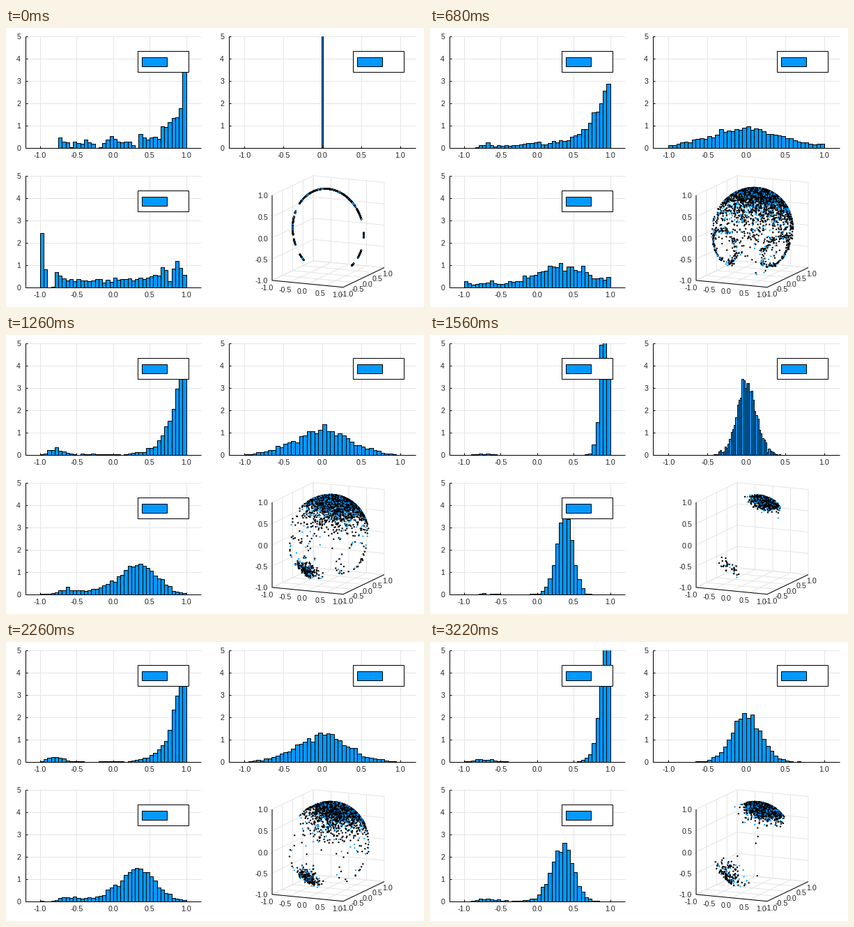
Recreate the animation shown at these times as a matplotlib script. Size 600 by 400 pixels, loop 3.24 s.

```python
import numpy as np
import matplotlib.pyplot as plt
from matplotlib.animation import FuncAnimation
from matplotlib.collections import LineCollection, PolyCollection
from matplotlib.patches import Rectangle

W, H, DPI = 600, 400, 100
PX = 72 / DPI
BLUE, GRID, INK = "#0099ff", "#e4e4e4", "#222222"
N = 3600
TICK_MS, LOOP_MS = 20, 3240
FLAT_STEPS = 12

# step, centre deg, in-plane spread, cross spread, tail,
# far share, far angle deg, far spread, ring share
KEYS = np.array([
    [11, 18, .55, .02, .30, .00, -150, .10, .14],
    [14, 18, .50, .50, .45, .00, -150, .10, .10],
    [20, 22, .068, .075, .0, .40, -158, .068, 0],
    [27, 20, .33, .38, .35, .06, -142, .16, .02],
    [34, 22, .118, .122, .18, .01, -140, .16, 0],
    [37, 21, .28, .33, .35, .04, -142, .16, .01],
    [41, 22, .105, .104, .08, .06, -154.5, .12, 0],
    [49, 20, .30, .35, .35, .06, -145, .16, .01],
    [56, 22, .122, .126, .08, .13, -154.5, .125, 0],
    [63, 20, .30, .36, .35, .05, -142, .16, .01],
    [69, 20.5, .165, .185, .25, .045, -139, .20, 0],
])

# start deg, end deg, share of the flat arc's outer pieces
PIECES = [(-137, -127, .03), (-113, -105, .03), (-99, -74, .10),
          (-69, -66, .025), (53, 69, .10), (87, 94, .03),
          (111, 124, .05), (134, 139, .02)]


def on_sphere(theta, phi):
    c = np.cos(phi)
    return np.column_stack([c * np.cos(theta), np.sin(phi), c * np.sin(theta)])


def flat_cloud(step, rng):
    """Broken arc in the plane of the first and third components."""
    wave = np.sin(step * (1.1 + .37 * np.arange(len(PIECES))))
    share = np.array([p[2] for p in PIECES]) * (1 + .3 * wave)
    kind = rng.choice(len(PIECES) + 1, N, p=[*share, 1 - share.sum()])
    theta = np.where(rng.random(N) < .67, rng.uniform(-54, 50.5, N),
                     rng.triangular(-54, 50, 50.5, N))
    for i, (a, b, _) in enumerate(PIECES):
        sel = kind == i
        theta[sel] = rng.uniform(a, b, sel.sum()) + 2 * wave[i]
    return on_sphere(np.radians(theta), np.zeros(N))


def ring(theta, y, n, rng):
    e = on_sphere(np.radians([theta]), np.arcsin([y]))[0]
    u = np.cross(e, [0, 1, 0])
    u /= np.linalg.norm(u)
    v = np.cross(e, u)
    r = np.radians(rng.normal(24, 2.5, n))[:, None]
    a = rng.uniform(0, 2 * np.pi, n)[:, None]
    return np.cos(r) * e + np.sin(r) * (np.cos(a) * u + np.sin(a) * v)


def cloud(step):
    rng = np.random.default_rng(100 + step)
    if step < FLAT_STEPS:
        return flat_cloud(step, rng)
    mid, s_in, s_out, tail, far, far_deg, s_far, rings = [
        np.interp(step, KEYS[:, 0], col) for col in KEYS[:, 1:].T]
    w = np.exp(tail * rng.standard_normal(N))
    g, k = rng.standard_normal((2, N))
    is_far = rng.random(N) < far
    theta = np.where(is_far, np.radians(far_deg) + s_far * g,
                     np.radians(mid) + s_in * w * g)
    phi = np.where(is_far, s_far, s_out * w) * k
    pts = on_sphere(theta, 1.55 * np.tanh(phi / 1.55))
    m = int(N * rings / 2)
    if m:
        pts[:m] = ring(-118, .05, m, rng)
        pts[m:2 * m] = ring(112, -.3, m, rng)
        rng.shuffle(pts)
    return pts


def nice_bins(v):
    lo, hi = v.min(), v.max()
    if hi - lo < 1e-6:
        return np.array([-.005, .005])
    raw = (hi - lo) / np.sqrt(N)
    base = 10 ** np.floor(np.log10(raw))
    r = raw / base
    size = base * (1 if r <= 1.1 else 2 if r <= 2.2 else 5 if r <= 5.5 else 10)
    first, last = np.floor(lo / size), np.floor(hi / size) + 1
    return np.arange(first, last + .5) * size


def project(c, b, a):
    return 462.5 + 51 * c + 29.5 * b, 291.7 + 4.9 * c - 14.1 * b - 61 * a


fig = plt.figure(figsize=(W / DPI, H / DPI), dpi=DPI, facecolor="white")
ax = fig.add_axes([0, 0, 1, 1])
ax.set_xlim(0, W)
ax.set_ylim(H, 0)
ax.axis("off")


def label(x, y, s, ha="center"):
    ax.text(x, y, s, ha=ha, va="center_baseline", color=INK,
            fontsize=10.6 * PX, family="Liberation Sans")


def lines(segs, color, z):
    ax.add_collection(LineCollection(segs, colors=color, linewidths=PX, zorder=z))


def box(x, y, w, h, face, z):
    ax.add_patch(Rectangle((x, y), w, h, fc=face, ec="black", lw=PX, zorder=z))


class Histogram:
    def __init__(self, left, right, top, legend_x):
        self.mid, self.unit = (left + right) / 2, (right - left) / 2.4
        self.base = top + 160
        grid, axes = [], [[(left, top), (left, self.base)],
                          [(left, self.base), (right, self.base)]]
        for v in np.arange(-1, 1.1, .5):
            x = self.mid + v * self.unit
            grid.append([(x, top), (x, self.base)])
            axes.append([(x, self.base), (x, self.base - 3)])
            label(x, self.base + 10, f"{v:.1f}")
        for v in range(6):
            y = self.base - 32 * v
            grid.append([(left, y), (right, y)])
            axes.append([(left, y), (left + 3, y)])
            label(left - 7, y, str(v), "right")
        lines(grid, GRID, 1)
        lines(axes, "black", 4)
        self.bars = PolyCollection([], facecolors=BLUE, edgecolors="black",
                                   linewidths=PX, zorder=3)
        ax.add_collection(self.bars)
        self.bars.set_clip_path(Rectangle((left, top - .5), right - left, 161,
                                          transform=ax.transData))
        box(legend_x, top + 21, 73, 30, "white", 5)
        box(legend_x + 6, top + 29.5, 36, 13, BLUE, 6)
        label(legend_x + 47, top + 36.5, "y1", "left")

    def show(self, v):
        edges = nice_bins(v)
        dens, _ = np.histogram(v, edges, density=True)
        x = self.mid + edges * self.unit
        y = self.base - 32 * np.minimum(dens, 8)
        b = self.base
        self.bars.set_verts([[(p, b), (p, t), (q, t), (q, b)]
                             for p, q, t in zip(x, x[1:], y)])


def draw_cube():
    grid = []
    for i, v in enumerate(np.arange(-1, 1.1, .5)):
        for path in ([(v, -1, -1), (v, 1, -1), (v, 1, 1)],
                     [(1, v, -1), (-1, v, -1), (-1, v, 1)],
                     [(-1, -1, v), (-1, 1, v), (1, 1, v)]):
            grid.append([project(*p) for p in path])
        s = f"{v:.1f}"
        shift = 0 if v < 0 else -2
        label(375 + 25.5 * i + shift / 2, 372.5 + 2.4 * i, s)
        label(490 + 14.4 * i, 381 - 7.2 * i, s)
        label(376, 362.5 - 30.5 * i, s, "right")
    lines(grid, GRID, 1)
    frame = [(-1, -1, 1), (-1, -1, -1), (1, -1, -1), (1, 1, -1)]
    lines([[project(*p) for p in frame]], "black", 2)


hists = [Histogram(28, 279.5, 12, 189),
         Histogram(320, 588, 12, 497.5),
         Histogram(28, 279.5, 212, 189)]
draw_cube()
tint = np.random.default_rng(5).random(N) < .27
dots = ax.scatter(np.zeros(N), np.zeros(N), s=np.where(tint, 2.4, 2.9),
                  c=np.where(tint, BLUE, "black"), linewidths=0, zorder=3)


def step_at(tick):
    """Steps last 20, 100 and 20 ms in turn."""
    cycle, rest = divmod(tick * TICK_MS, 140)
    return 3 * cycle + (rest >= 20) + (rest >= 120)


shown = None


def update(tick):
    global shown
    step = step_at(tick)
    if step != shown:
        shown = step
        pts = cloud(step)
        for hist, v in zip(hists, pts.T):
            hist.show(v)
        a, b, c = pts.T
        dots.set_offsets(np.column_stack(project(c, b, a)))
    return [dots, *(h.bars for h in hists)]


anim = FuncAnimation(fig, update, frames=LOOP_MS // TICK_MS, interval=TICK_MS,
                     repeat=True, repeat_delay=0, blit=False)
plt.show()
```
